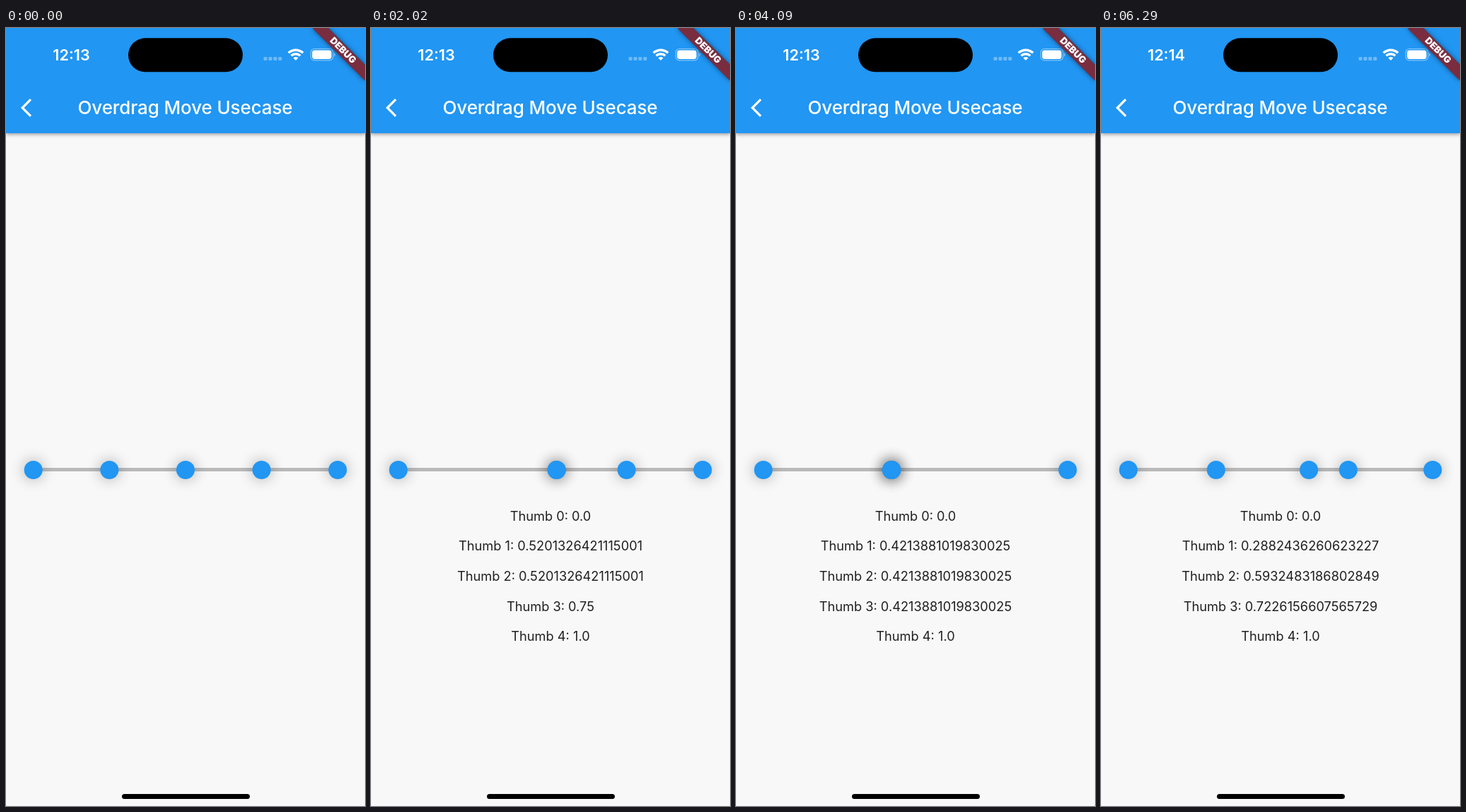
An HTML page that plays this animation: 508x1102 px, repeating every 6.39 s.

```html
<!DOCTYPE html>
<html lang="en">
<head>
<meta charset="utf-8">
<title>Overdrag Move Usecase</title>
<style>
  html, body { margin: 0; width: 100%; height: 100%; overflow: hidden; }
  body { background: #f8f8f8; font-family: Inter, "Liberation Sans", sans-serif; }
  #stage { position: relative; width: 508px; height: 1102px; overflow: hidden; background: #f8f8f8; }
  #stage > * { position: absolute; }
  .bar {
    left: 0; top: 0; width: 508px; height: 149px; background: #2196f3;
    box-shadow: 0 2px 5px rgba(0, 0, 0, .36);
  }
  .icons { left: 0; top: 0; }
  .clock {
    left: 32.5px; top: 24px; width: 120px; line-height: 28px; text-align: center;
    font-size: 21.6px; font-weight: 600; color: #fff;
  }
  .title {
    left: 0; top: 96px; width: 507px; line-height: 34px; text-align: center; white-space: nowrap;
    font-size: 26px; font-weight: 500; letter-spacing: -.12px; color: #fff;
  }
  .banner {
    left: 455.9px; top: 36.5px; width: 104.2px; height: 15.6px;
    transform-origin: 52.1px -36.5px; transform: rotate(45deg);
    background: linear-gradient(#b71c1ca0, #b71c1ca0), rgba(0, 0, 0, .5);
    box-shadow: 0 0 7.8px rgba(0, 0, 0, .5);
    font-size: 13.3px; font-weight: 900; line-height: 15.6px; text-align: center; color: #fff;
  }
  .track { left: 38.7px; top: 622.9px; width: 430.6px; height: 5.2px; background: #bababa; }
  .thumb {
    left: -13px; top: 612.5px; width: 26px; height: 26px; border-radius: 50%;
    background: #2196f3; box-shadow: 0 0 20px rgba(0, 0, 0, .32);
  }
  .row {
    left: 0; width: 508px; line-height: 26px; text-align: center; white-space: nowrap;
    font-size: 18.23px; color: #202020;
  }
  .home { left: 164px; top: 1085px; width: 181px; height: 6.6px; border-radius: 4px; background: #000; }
</style>
</head>
<body>
<div id="stage">
  <div class="bar"></div>
  <svg class="icons" width="508" height="149" fill="#fff">
    <rect x="173" y="14.3" width="162" height="48" rx="24" fill="#000"/>
    <g opacity=".35">
      <rect x="364.6" y="41" width="5" height="5" rx="1.2"/>
      <rect x="371.5" y="41" width="5" height="5" rx="1.2"/>
      <rect x="378.4" y="41" width="5" height="5" rx="1.2"/>
      <rect x="385.3" y="41" width="5" height="5" rx="1.2"/>
    </g>
    <g transform="translate(410 46)">
      <path d="M0 0L-3.5-3.6A5 5 0 0 1 3.5-3.6Z"/>
      <path d="M-6.4-6.7A9.3 9.3 0 0 1 6.4-6.7M-10.3-10.7A15 15 0 0 1 10.3-10.7"
            fill="none" stroke="#fff" stroke-width="3.4"/>
    </g>
    <rect x="431.2" y="29.5" width="31.6" height="16.4" rx="5" fill="none" stroke="#fff" stroke-opacity=".45" stroke-width="1.2"/>
    <rect x="433.2" y="31.5" width="27.4" height="12.4" rx="3.4"/>
    <path d="M464.3 35a3 3 0 0 1 0 5.4Z" opacity=".5"/>
    <path d="M35 101.2L23.2 113L35 124.8" fill="none" stroke="#fff" stroke-width="3.2"/>
  </svg>
  <div class="clock"></div>
  <div class="title">Overdrag Move Usecase</div>
  <div class="track"></div>
  <div class="home"></div>
  <div class="banner">DEBUG</div>
</div>
<script>
const LOOP = 6390, STEP = 30;
const stage = document.getElementById('stage');
const clock = document.querySelector('.clock');

// Drags as [time, value] points
const dragRight = [[950, 0.25], [1540, 0.41052877193807535], [2440, 0.5691689985669708]];
const dragLeft = [[3340, 0.75], [3820, 0.5696411565072811], [4090, 0.4213881019830025], [4360, 0.2882436260623227]];
const dragBack = [[4620, 0.2882436260623227], [4860, 0.5063739376770536], [5150, 0.7226156607565729]];
const dragMiddle = [[5920, 0.2882436260623227], [6290, 0.5932483186802849]];

const rate = (a, b) => (b[1] - a[1]) / (b[0] - a[0]);

// Monotone slope at a point, at rest at both ends
function slope(keys, i) {
  if (i === 0 || i === keys.length - 1) return 0;
  const p = rate(keys[i - 1], keys[i]), q = rate(keys[i], keys[i + 1]);
  return 2 * p * q / (p + q);
}

function valueAt(keys, t) {
  const last = keys.length - 1;
  if (t <= keys[0][0]) return keys[0][1];
  if (t >= keys[last][0]) return keys[last][1];
  const i = keys.findIndex((k, n) => t < keys[n + 1][0]);
  const [t0, v0] = keys[i], [t1, v1] = keys[i + 1];
  const span = t1 - t0, n = Math.round(span / STEP);
  const u = Math.floor((t - t0) / span * n + 1e-6) / n;
  if (u === 0) return v0;
  const w = 1 - u;
  return v0 * w * w * (1 + 2 * u) + v1 * u * u * (3 - 2 * u)
    + span * u * w * (slope(keys, i) * w - slope(keys, i + 1) * u);
}

// A dragged thumb pushes its neighbours along
function thumbValues(t) {
  const right = valueAt(dragRight, t), left = valueAt(dragLeft, t);
  return [
    0,
    Math.min(right, left),
    t < 5920 ? Math.min(Math.max(0.5, right), left) : valueAt(dragMiddle, t),
    t < 4620 ? left : valueAt(dragBack, t),
    1
  ];
}

function add(className) {
  const el = document.createElement('div');
  el.className = className;
  return stage.appendChild(el);
}

const thumbs = Array.from({ length: 5 }, () => add('thumb'));
const rows = thumbs.map((_, i) => {
  const row = add('row');
  row.style.top = 677.5 + i * 42.7 + 'px';
  return row;
});

const format = v => Number.isInteger(v) ? v.toFixed(1) : String(v);

function draw(t) {
  clock.textContent = t < 4650 ? '12:13' : '12:14';
  thumbValues(t).forEach((v, i) => {
    thumbs[i].style.transform = `translateX(${38.7 + 430.6 * v}px)`;
    rows[i].textContent = t < 980 ? '' : `Thumb ${i}: ${format(v)}`;
  });
}

const start = performance.now();
function tick() {
  draw((performance.now() - start) % LOOP);
  requestAnimationFrame(tick);
}
tick();
</script>
</body>
</html>
```
